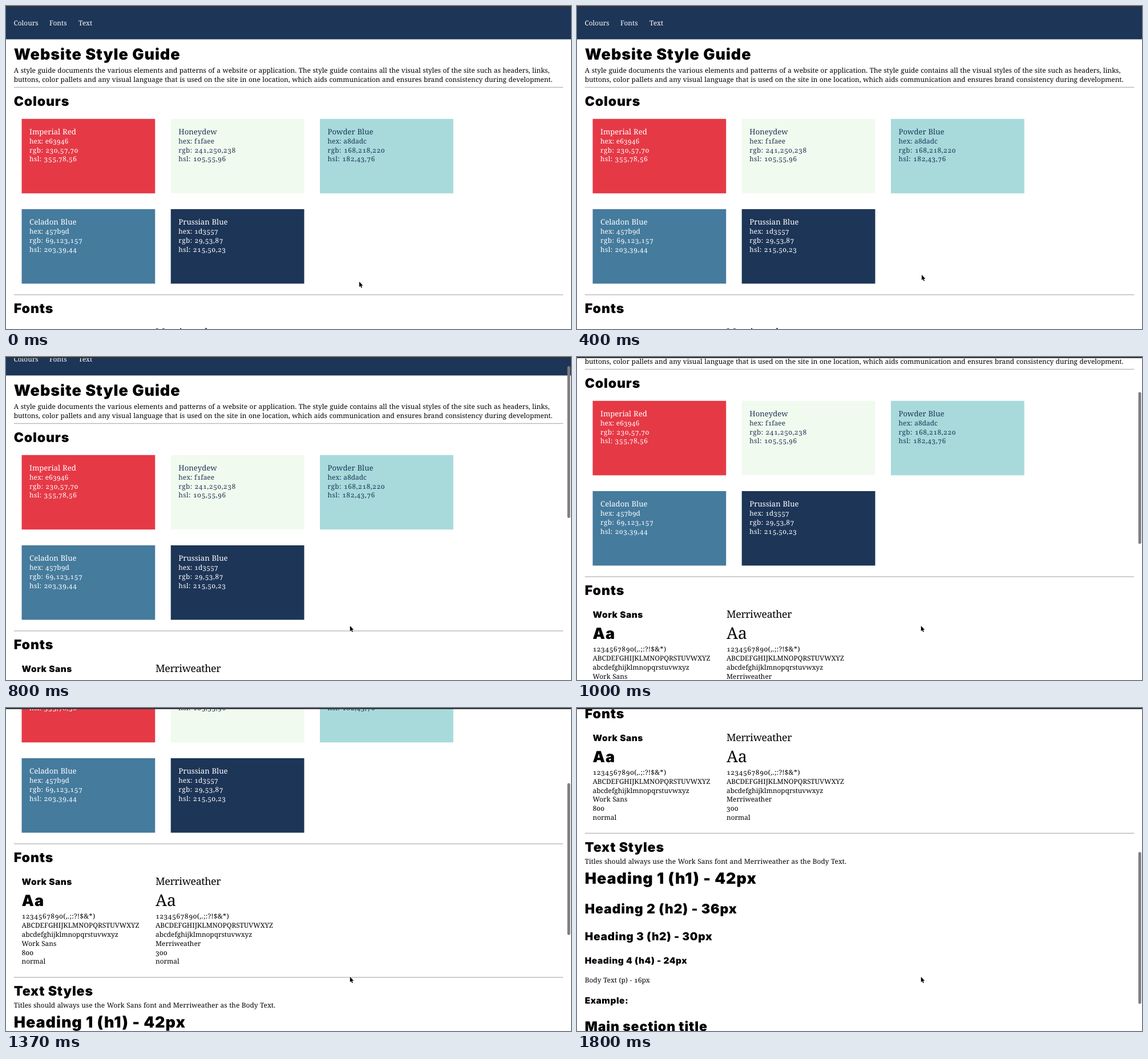
Recreate the animation shown at these times as an HTML page. Size 990 by 566 pixels, loop 2 s.

```html
<!DOCTYPE html>
<html lang="en">
<head>
<meta charset="utf-8">
<title>Website Style Guide</title>
<style>
  @property --scroll {
    syntax: "<number>";
    inherits: true;
    initial-value: 0;
  }
  html, body { margin: 0; width: 100%; height: 100%; overflow: hidden; background: #fff; }
  svg {
    display: block;
    width: 990px;
    height: 566px;
    animation: scroll 2s step-end infinite;
  }
  text {
    font: 400 11.86px "Noto Serif", serif;
    font-variant-numeric: oldstyle-nums;
    text-rendering: geometricPrecision;
    white-space: pre;
    word-spacing: .47px;
  }
  .h1, .h2, .h3, .h4 {
    font-family: Inter, sans-serif;
    font-weight: 900;
    font-variant-numeric: normal;
    letter-spacing: .035em;
    word-spacing: 0;
  }
  .h1 { font-size: 27px; }
  .h2 { font-size: 23.14px; }
  .h3 { font-size: 19.3px; }
  .h4 { font-size: 15.43px; }
  .name { font-size: 13.12px; }
  .nums { letter-spacing: .4px; }
  .serif { font-size: 17.8px; letter-spacing: -.4px; }
  .big { font-size: 28.4px; }
  #page { transform: translateY(calc(var(--scroll) * -1px)); }
  #thumb {
    transform: translateY(calc(3.6px + var(--scroll) * .478px));
    animation: show 2s step-end infinite;
  }
  #cursor { animation: point 2s step-end infinite; }

  @keyframes scroll {
    0% { --scroll: 0; }
    33.5% { --scroll: 5; }
    40% { --scroll: 26; }
    50% { --scroll: 121; }
    60% { --scroll: 215; }
    68.5% { --scroll: 268; }
    80% { --scroll: 290.5; }
    90%, 100% { --scroll: 520.5; }
  }
  @keyframes show {
    0% { opacity: 0; }
    33.5%, 100% { opacity: 1; }
  }
  @keyframes point {
    0% { transform: translate(619px, 483px); }
    20% { transform: translate(604px, 471px); }
    33.5%, 100% { transform: translate(602.7px, 471px); }
  }
</style>
</head>
<body>
<svg viewBox="0 0 990 566">
  <g id="page"></g>
  <rect width="990" height="2" fill="#333"/>
  <rect id="thumb" x="983.6" width="5" height="266" rx="2.5" fill="#7e7e7e"/>
  <path id="cursor" d="M0 0V9.4L2.1 7.5L3.6 10.9L5.1 10.2L3.6 6.9H6.4Z"
        fill="#000" stroke="#fff" stroke-width=".8" paint-order="stroke"/>
</svg>
<script>
  const page = document.getElementById("page");
  const LEFT = 13.75, LINE = 15.8, INK = "#1d3557", PALE = "#fff";

  function add(tag, attrs, content = "") {
    const el = document.createElementNS("http://www.w3.org/2000/svg", tag);
    for (const key in attrs) el.setAttribute(key, attrs[key]);
    el.textContent = content;
    page.append(el);
  }
  const rect = (x, y, width, height, fill) => add("rect", { x, y, width, height, fill });
  const text = (x, y, content, cls = "", fill = "#000") =>
    add("text", { x, y, class: cls, fill }, content);
  const rule = y => rect(LEFT, y - .65, 962.5, 1.3, "#b4b4b4");

  function swatch(col, row, name, hex, rgb, hsl, ink) {
    const x = 27.5 + col * 261.25, y = 197.8 + row * 158.2;
    rect(x, y, 233.75, 130.5, "#" + hex);
    text(x + 13.6, y + 26.9, name, "name", ink);
    text(x + 13.6, y + 43, "hex: " + hex, "", ink);
    text(x + 13.6, y + 43 + LINE, "rgb: " + rgb, "nums", ink);
    text(x + 13.6, y + 43 + 2 * LINE, "hsl: " + hsl, "nums", ink);
  }

  function specimen(x, family, weight, titleClass, sampleClass) {
    text(x, 578.1, family, titleClass);
    text(x, 615.3, "Aa", sampleClass);
    ["1234567890(,.;:?!$&*)", "ABCDEFGHIJKLMNOPQRSTUVWXYZ", "abcdefghijklmnopqrstuvwxyz",
     family, weight, "normal"]
      .forEach((s, i) => text(x, 637.4 + i * LINE, s, i ? "" : "nums"));
  }

  rect(0, 0, 990, 58.4, INK);
  text(13.5, 34.3, "Colours", "", PALE);
  text(76, 34.3, "Fonts", "", PALE);
  text(127, 34.3, "Text", "", PALE);

  text(LEFT, 94, "Website Style Guide", "h1");
  text(LEFT, 116.9, "A style guide documents the various elements and patterns of a website or application. The style guide contains all the visual styles of the site such as headers, links,");
  text(LEFT, 132.7, "buttons, color pallets and any visual language that is used on the site in one location, which aids communication and ensures brand consistency during development.");
  rule(142.5);

  text(LEFT, 174.5, "Colours", "h2");
  swatch(0, 0, "Imperial Red", "e63946", "230,57,70", "355,78,56", PALE);
  swatch(1, 0, "Honeydew", "f1faee", "241,250,238", "105,55,96", INK);
  swatch(2, 0, "Powder Blue", "a8dadc", "168,218,220", "182,43,76", INK);
  swatch(0, 1, "Celadon Blue", "457b9d", "69,123,157", "203,39,44", PALE);
  swatch(1, 1, "Prussian Blue", "1d3557", "29,53,87", "215,50,23", PALE);
  rule(506);

  text(LEFT, 538.2, "Fonts", "h2");
  specimen(27.5, "Work Sans", "800", "h4", "h1");
  specimen(262, "Merriweather", "300", "serif", "big");
  rule(740);

  text(LEFT, 772.4, "Text Styles", "h2");
  text(LEFT, 793.4, "Titles should always use the Work Sans font and Merriweather as the Body Text.");
  text(LEFT, 828.3, "Heading 1 (h1) - 42px", "h1");
  text(LEFT, 880.4, "Heading 2 (h2) - 36px", "h2");
  text(LEFT, 927.6, "Heading 3 (h2) - 30px", "h3");
  text(LEFT, 968.1, "Heading 4 (h4) - 24px", "h4");
  text(LEFT, 1001.7, "Body Text (p) - 16px");
  text(LEFT, 1038.6, "Example:", "h4");
  text(LEFT, 1086.4, "Main section title", "h2");
</script>
</body>
</html>
```
